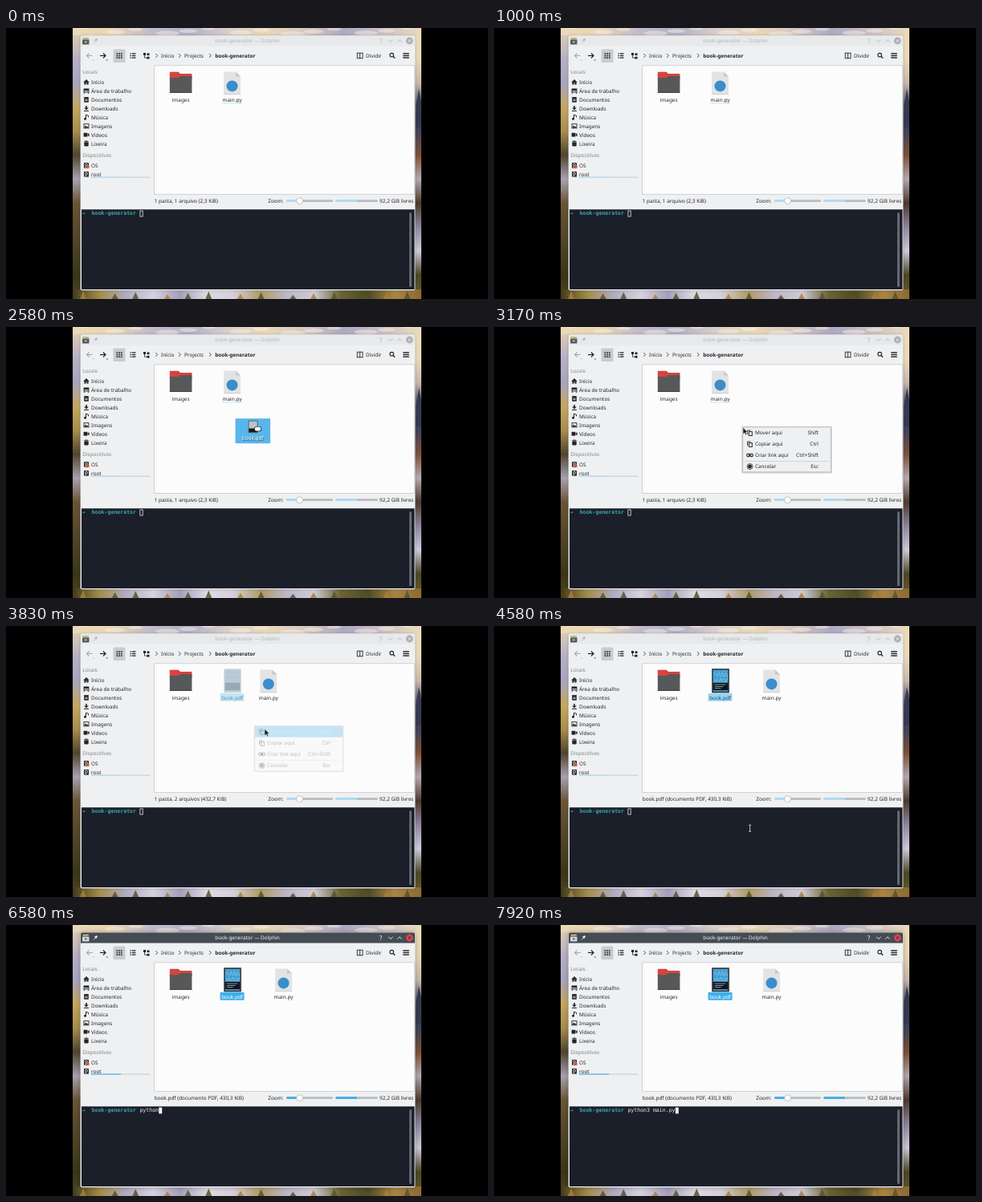
Animation, 600 px wide and 338 px high, one loop 8 s. Source, as an HTML page with a canvas:

```html
<!DOCTYPE html>
<html lang="pt-BR">
<head>
<meta charset="utf-8">
<title>book-generator</title>
<style>
html, body { margin: 0; width: 100%; height: 100%; overflow: hidden; background: #000; }
canvas { display: block; width: 600px; height: 338px; }
</style>
</head>
<body>
<canvas id="stage"></canvas>
<script>
const LOOP = 8000, FPS = 12;
const cv = document.getElementById('stage');
const dpr = Math.max(1, window.devicePixelRatio || 1);
cv.width = 600 * dpr;
cv.height = 338 * dpr;
const g = cv.getContext('2d');
const INK = '#232629', PANEL = '#eff0f1', BLUE = '#3daee9';
const SANS = '"Noto Sans", sans-serif', MONO = '"DejaVu Sans Mono", monospace';

const clamp = u => Math.max(0, Math.min(1, u));
const ramp = (t, a, b) => clamp((t - a) / (b - a));
const ease = u => u * u * (3 - 2 * u);
const lerp = (a, b, u) => a + (b - a) * u;
const mix = (a, b, u) => 'rgb(' + a.map((v, i) => Math.round(lerp(v, b[i], u))) + ')';

function rect(x, y, w, h, c) { g.fillStyle = c; g.fillRect(x, y, w, h); }
function round(x, y, w, h, r, c) { g.fillStyle = c; g.beginPath(); g.roundRect(x, y, w, h, r); g.fill(); }
function frame(x, y, w, h, c, lw = 1) { g.strokeStyle = c; g.lineWidth = lw; g.strokeRect(x, y, w, h); }
function dot(x, y, r, c) { g.fillStyle = c; g.beginPath(); g.arc(x, y, r, 0, 7); g.fill(); }
function ring(x, y, r, c, lw = 1) { g.strokeStyle = c; g.lineWidth = lw; g.beginPath(); g.arc(x, y, r, 0, 7); g.stroke(); }
function path(p) { g.beginPath(); for (let i = 0; i < p.length; i += 2) g.lineTo(p[i], p[i + 1]); }
function poly(p, c) { path(p); g.closePath(); g.fillStyle = c; g.fill(); }
function line(p, c = INK, lw = 1) { path(p); g.strokeStyle = c; g.lineWidth = lw; g.stroke(); }
function text(s, x, y, c = INK, align = 'left', font = '6.4px ' + SANS) {
  g.font = font; g.textAlign = align; g.fillStyle = c; g.fillText(s, x, y);
}
function faded(alpha, fn) {
  if (alpha <= 0) return;
  g.save(); g.globalAlpha *= alpha; fn(); g.restore();
}
function at(x, y, fn) { g.save(); g.translate(x, y); fn(); g.restore(); }
function gradient(x, y, w, h, vertical, colors) {
  const gr = g.createLinearGradient(x, y, vertical ? x : x + w, vertical ? y + h : y);
  colors.forEach((c, i) => gr.addColorStop(i / (colors.length - 1), c));
  rect(x, y, w, h, gr);
}

function wallpaper() {
  gradient(83, 0, 434, 11, false, ['#ead9b8', '#e9d5b4', '#c3bccb', '#b3aec6', '#d8cfcb', '#ead8b8',
    '#d6c8c2', '#aea8c2', '#cbc0c6', '#ecdbba']);
  gradient(83, 9, 11, 329, true, ['#dccbb6', '#b6b0c6', '#a9a4bf', '#c4a860', '#a88d4c', '#51452f',
    '#a8a2b0', '#6a5535', '#5a4a2c', '#4a4122', '#3a3519', '#4e4520']);
  gradient(508, 9, 9, 329, true, ['#eddcba', '#ead8b8', '#c9b9ae', '#4a4a61', '#41435a', '#7d5138',
    '#b5a9ae', '#4d3a2c', '#8f86a0', '#cfcad8', '#4b4724', '#6b5a2a']);
  gradient(83, 326, 434, 12, false, ['#3f3a1c', '#a48c48', '#b1abc4', '#d6d2de', '#a49eba', '#dedae2',
    '#d4cfd8', '#b09a66', '#bdb7ca', '#d0cbd6', '#6a6232', '#4c4a26', '#a98543', '#8a6a34']);
  // clouds above, tree tops below
  for (let i = 0; i < 14; i++) {
    const r = (i * 0.618) % 1, x = 96 + i * 31 + r * 14;
    g.globalAlpha = 0.5;
    g.fillStyle = '#f6efe4';
    g.beginPath();
    g.ellipse(x, r * 8, 7 + r * 9, 1.5 + r * 2, 0, 0, 7);
    g.fill();
    g.globalAlpha = 0.85;
    poly([x - 4, 338, x, 328 + r * 5, x + 4, 338], i % 3 ? '#57522b' : '#a97f3a');
  }
  g.globalAlpha = 1;
  poly([510, 124, 511, 94, 514, 76, 517, 92, 517, 124], '#363a52');
}

function titlebar(a) {
  const fg = mix([178, 182, 185], [245, 246, 247], a);
  round(93, 9.5, 416, 14, [2, 2, 0, 0], mix([231, 233, 234], [68, 75, 83], a));
  round(95, 14.5, 8.5, 6, 0.8, mix([88, 93, 97], [210, 214, 217], a));
  rect(95.7, 11.8, 7.1, 1.5, '#d9c36a');
  rect(95.3, 13.3, 7.9, 1.2, '#7f9a6d');
  rect(98, 16.8, 2.6, 1.2, mix([225, 227, 229], [59, 64, 69], a));
  line([109, 18.5, 111, 16.5], fg, 0.8);
  poly([110, 15, 112.5, 13, 114, 14.5, 112, 17], fg);
  text('book-generator — Dolphin', 300.5, 18.2, fg, 'center');
  text('?', 466.5, 18.8, fg, 'center', '8px ' + SANS);
  line([476, 14.8, 478.8, 17.4, 481.6, 14.8], fg, 0.9);
  line([487.2, 17.4, 490, 14.8, 492.8, 17.4], fg, 0.9);
  dot(502.3, 16, 4.4, mix([172, 176, 179], [218, 68, 83], a));
  const x = mix([240, 241, 242], [60, 40, 45], a);
  line([500.6, 14.3, 504, 17.7], x, 0.9);
  line([504, 14.3, 500.6, 17.7], x, 0.9);
}

function chevron(x, y) { line([x - 1.2, y - 2.4, x + 1.2, y, x - 1.2, y + 2.4], INK, 0.8); }

function toolbar() {
  const dim = '#a5a8aa', y = 34.5;
  line([107.5, y, 100.5, y], dim, 1.1);
  line([103.5, y - 3, 100.5, y, 103.5, y + 3], dim, 1.1);
  line([107.6, 39.4, 108.8, 40.5, 110, 39.4], dim, 0.7);
  line([117, y, 124, y], INK, 1.2);
  line([121, y - 3, 124, y, 121, y + 3], INK, 1.2);
  line([124.6, 39.4, 125.8, 40.5, 127, 39.4], INK, 0.7);
  round(133.5, 26.5, 15, 16.5, 1.5, '#c9cbcd');
  for (let i = 0; i < 3; i++) {
    for (let j = 0; j < 3; j++) rect(137.5 + i * 2.7, 31.2 + j * 2.6, 1.7, 1.6, INK);
    rect(154.5, 31.3 + i * 2.6, 1.4, 1.3, INK);
    rect(156.8, 31.3 + i * 2.6, 4.6, 1.3, INK);
    rect(494.2, 31.2 + i * 2.6, 7.6, 1.4, INK);
  }
  rect(171, 31, 3, 3, INK);
  rect(175.5, 31.5, 3, 2.6, INK);
  rect(175.5, 35.8, 3, 2.8, INK);
  line([172.5, 33, 172.5, 37.2, 176, 37.2], INK, 0.8);
  chevron(187.5, y); chevron(216.2, y); chevron(254.2, y);
  text('Início', 193, 36.9);
  text('Projects', 222, 36.9);
  text('book-generator', 260.3, 36.9, INK, 'left', 'bold 6.4px ' + SANS);
  frame(437.2, 31.2, 6.8, 6.6, INK, 0.9);
  line([440.6, 31, 440.6, 38], INK, 0.9);
  text('Dividir', 448, 36.9);
  ring(480.2, 33.7, 2.3, INK, 1.1);
  line([481.9, 35.4, 484.2, 37.8], INK, 1.3);
}

// Place icons, each drawn around its own centre
const drive = () => {
  round(-3, -3.4, 6, 6.8, 0.8, INK);
  ring(0, -0.8, 1.5, '#fff', 0.8);
  rect(-2, 1.8, 2.4, 0.7, '#fff');
};
const places = [
  ['Início', 67.5, () => { poly([-3.8, 0.2, 0, -3.5, 3.8, 0.2], INK); rect(-2.6, 0, 2, 3.2, INK); rect(0.6, 0, 2, 3.2, INK); rect(-1, 0, 2, 1.2, INK); }],
  ['Área de trabalho', 78.5, () => { rect(-3.4, -3, 6.8, 4.8, INK); rect(-2.6, -0.4, 5.2, 1.3, '#d5d7d8'); rect(-3.4, 2, 1.6, 1.2, INK); rect(1.8, 2, 1.6, 1.2, INK); }],
  ['Documentos', 89.4, () => { rect(-2.8, -3.3, 5.6, 6.6, INK); rect(-1.6, -0.6, 3.2, 0.7, '#fff'); rect(-1.6, 1, 3.2, 0.7, '#fff'); }],
  ['Downloads', 100.4, () => { rect(-0.8, -3.4, 1.6, 3, INK); poly([-2.8, -1, 2.8, -1, 0, 2], INK); rect(-3, 2.5, 6, 1, INK); }],
  ['Música', 111.3, () => { dot(-1.5, 2, 1.5, INK); line([-0.5, 2, -0.5, -3, 2.5, -2, 2.5, 0], INK, 1); }],
  ['Imagens', 122.3, () => { frame(-3, -2.6, 6, 5.2, INK, 0.9); poly([-2.8, 2.2, -0.8, -0.8, 0.6, 1, 1.4, 0.2, 2.8, 2.2], INK); }],
  ['Vídeos', 133.2, () => { rect(-3.4, -2.4, 4.8, 4.8, INK); poly([1.2, 0, 3.6, -2.3, 3.6, 2.3], INK); }],
  ['Lixeira', 144.1, () => { rect(-2.8, -2.8, 5.6, 1, INK); rect(-1.2, -3.6, 2.4, 1, INK); round(-2.7, -1.6, 5.4, 5, 1, INK); }],
  ['OS', 171.4, () => { drive(); dot(1.8, 1.9, 1.9, '#e95420'); }],
  ['root', 182.4, drive]
];

function sidebar(accent) {
  text('Locais', 95.3, 56.8, '#7d8487');
  text('Dispositivos', 95.3, 160.9, '#7d8487');
  for (const [name, y, icon] of places) {
    at(100, y, icon);
    text(name, 106, y + 2.4);
  }
  rect(106, 185.6, 73.5, 1, '#c6c8ca');
  rect(106, 185.6, 37, 1, accent);
}

function folder(x) {
  text('images', x, 91.7, INK, 'center');
  poly([x - 13.8, 54.8, x - 3, 54.8, x - 0.5, 57, x + 13.8, 57, x + 13.8, 64, x - 13.8, 64], '#d8433f');
  poly([x - 13.8, 62, x - 3, 62, x - 0.5, 60, x + 13.8, 60, x + 13.8, 80.8, x - 13.8, 80.8], '#57585a');
  rect(x - 13.8, 80, 27.6, 0.9, '#3c3d3f');
}

function script(x, underline) {
  poly([x - 10.4, 54.6, x + 4.5, 54.6, x + 10.4, 60.5, x + 10.4, 83, x - 10.4, 83], '#e2e3e4');
  poly([x + 4.5, 54.6, x + 10.4, 60.5, x + 4.5, 60.5], '#c6c9cb');
  rect(x - 10.4, 82.4, 20.8, 0.7, '#c3c5c7');
  dot(x, 72.4, 7, '#3a8ecb');
  text('main.py', x, 91.7, INK, 'center');
  if (underline) rect(x - 12.5, 93.6, 25, 0.7, '#a9d9f3');
}

function cover() {
  const x = 282;
  rect(x - 10.8, 53.3, 21.6, 30, '#23282d');
  rect(x - 9.4, 54.8, 18.8, 27, '#4ca5d7');
  for (let i = 0; i < 34; i++) {
    rect(x - 8.5 + (i * 6.18) % 16.5, 56 + (i * 2.39) % 14, 0.9, 0.8, i % 3 ? '#b9e0f4' : '#1f6f9f');
  }
  rect(x - 9.4, 70.8, 18.8, 9.4, '#10151a');
  for (let i = 0; i < 3; i++) rect(x - 7.5, 72.7 + i * 2.3, 14 - i * 3, 0.8, '#9fb4c0');
}

function coverLabel(active) {
  round(266.5, 84, 30, 9.8, 0.8, mix([150, 212, 244], [61, 174, 233], active));
  text('book.pdf', 281.6, 91.7, mix([35, 80, 108], [255, 255, 255], active), 'center');
}

function statusbar(msg, accent) {
  text(msg, 184.7, 218.2);
  text('Zoom:', 326.3, 218.2);
  round(349, 214.2, 58, 2.8, 1.4, '#b9bcbe');
  round(349, 214.2, 16, 2.8, 1.4, accent);
  dot(365.5, 215.7, 4, '#fbfbfb');
  ring(365.5, 215.7, 4, '#aeb2b4', 0.7);
  round(410.3, 214.2, 52.5, 2.8, 1.2, '#b9bcbe');
  round(410.3, 214.2, 26.7, 2.8, 1.2, accent);
  text('92,2 GiB livres', 507.3, 218.2, INK, 'right');
}

function terminal(typed, focused) {
  const cw = 3.95, y = 233.4, font = '6.56px ' + MONO;
  rect(94, 226.3, 414.5, 99.7, '#1b1f29');
  text('→', 94.6, y, '#3fae86', 'left', 'bold ' + font);
  text('book-generator', 106.8, y, '#3aa6ae', 'left', 'bold ' + font);
  text(typed, 166.4, y, '#f0f1f2', 'left', font);
  const x = 166.6 + typed.length * cw;
  if (focused) rect(x, 227.6, 3.9, 7.7, '#fcfcfc');
  else frame(x + 0.3, 228, 3.3, 7, '#e4e6e8', 0.8);
  round(502, 230, 3, 93, 1.5, '#646972');
}

function ghost(x, y) {
  rect(x, y, 43.5, 31, 'rgba(74,177,233,.92)');
  rect(x + 16, y + 2.5, 12, 15.5, '#596167');
  rect(x + 17, y + 3.5, 10, 9, '#b9c4c9');
  rect(x + 17, y + 12.5, 10, 4.5, '#15191d');
  text('book.pdf', x + 22.2, y + 27.6, 'rgba(10,40,60,.8)', 'center');
  text('book.pdf', x + 21.7, y + 27, '#fff', 'center');
  // closed hand
  round(x + 23.5, y + 10, 9, 6, 2.5, INK);
  round(x + 24.3, y + 10.7, 7.4, 4.6, 2, '#fff');
}

const copyIcon = () => { line([-3, 2, -3, -3, 1, -3], INK, 0.9); frame(-1.2, -1.4, 4, 4.8, INK, 1); };
const rows = [
  ['Mover aqui', 'Shift', 132, copyIcon],
  ['Copiar aqui', 'Ctrl', 146, copyIcon],
  ['Criar link aqui', 'Ctrl+Shift', 159.8, () => {
    g.strokeStyle = INK; g.lineWidth = 1.1;
    for (const x of [-3.8, 0.2]) { g.beginPath(); g.roundRect(x, -1.8, 3.6, 3.6, 1.7); g.stroke(); }
    rect(-1.8, -0.6, 3.6, 1.1, INK);
  }],
  ['Cancelar', 'Esc', 174, () => { ring(0, 0, 3.5, INK, 0.8); dot(0, 0, 2.4, INK); }]
];

function menu(hover) {
  frame(309, 124.6, 111, 57.2, 'rgba(0,0,0,.15)', 1.6);
  rect(309.3, 124.6, 110.2, 56.4, PANEL);
  frame(309.5, 124.9, 109.8, 56, '#a4a7a9', 0.7);
  if (hover) rect(310, 125.4, 109, 13.4, BLUE);
  rows.forEach(([name, key, y, icon], i) => {
    const c = hover && i === 0 ? '#fff' : INK;
    at(318.5, y, icon);
    text(name, 325, y + 2.3, c);
    text(key, 404, y + 2.3, c, 'right');
  });
  rect(312, 167, 105, 0.7, '#c5c8ca');
}

function pointer(x, y) {
  const p = [x, y, x, y + 8.2, x + 1.9, y + 6.4, x + 3.3, y + 9.2, x + 4.6, y + 8.5, x + 3.3, y + 5.9, x + 5.8, y + 5.7];
  poly(p, '#17191b');
  line([...p, x, y], '#f5f5f5', 0.5);
}

function ibeam(x, y) {
  line([x, y - 4, x, y + 4], '#e8e8e8', 0.8);
  line([x - 1.5, y - 4, x + 1.5, y - 4], '#e8e8e8', 0.8);
  line([x - 1.5, y + 4, x + 1.5, y + 4], '#e8e8e8', 0.8);
}

function mouse(t) {
  if (t < 2680 || t > 5150) return;
  const a = ease(ramp(t, 3300, 3600)), b = ease(ramp(t, 4300, 4680));
  const x = lerp(lerp(310, 322, a), 318, b);
  const y = lerp(lerp(125.5, 128.5, a), 276, b);
  if (y > 226) ibeam(x, y); else pointer(x, y);
}

function draw(t) {
  const active = ramp(t, 4720, 4880);
  const accent = mix([174, 219, 243], [61, 174, 233], active);
  const shift = ease(ramp(t, 3660, 3930));
  const typed = 'python3 main.py'.slice(0, Math.max(0, Math.floor((t - 5655) / 145)));
  const msg = t < 3700 ? '1 pasta, 1 arquivo (2,3 KiB)'
    : t < 4060 ? '1 pasta, 2 arquivos (432,7 KiB)'
    : 'book.pdf (documento PDF, 430,3 KiB)';

  g.setTransform(dpr, 0, 0, dpr, 0, 0);
  g.textRendering = 'geometricPrecision';
  rect(0, 0, 600, 338, '#000');
  g.save();
  g.beginPath(); g.rect(83, 0, 434, 338); g.clip();

  wallpaper();
  g.save();
  g.shadowColor = 'rgba(0,0,0,.3)'; g.shadowBlur = lerp(3, 6, active) * dpr;
  round(92.6, 9.5, 416.8, 317.8, 2, PANEL);
  g.restore();
  titlebar(active);
  rect(93.3, 22.5, 415.7, 204, PANEL);
  toolbar();
  sidebar(accent);
  rect(184.6, 46.8, 324, 160.8, '#fcfcfc');
  frame(184.6, 46.8, 324, 160.8, '#c0c3c5', 0.7);
  folder(217.6);
  faded(ease(ramp(t, 3750, 4050)), cover);
  faded(ease(ramp(t, 3680, 3960)), () => coverLabel(active));
  script(lerp(281.5, 345.5, shift), t < 3660);
  statusbar(msg, accent);
  terminal(typed, active > 0.5);

  if (t >= 1900 && t < 2680) {
    const a = ramp(t, 1870, 2167), b = ease(ramp(t, 2167, 2600));
    ghost(lerp(lerp(52, 174, a), 286, b), lerp(lerp(186, 149, a), 114, b));
  }
  faded(ramp(t, 2650, 2800) * (1 - ramp(t, 3690, 3890)), () => menu(t >= 3450));
  mouse(t);
  g.restore();
}

function tick(now) {
  const t = now % LOOP;
  draw(Math.floor((t + 5) * FPS / 1000) * 1000 / FPS % LOOP);
  requestAnimationFrame(tick);
}
requestAnimationFrame(tick);
</script>
</body>
</html>
```
